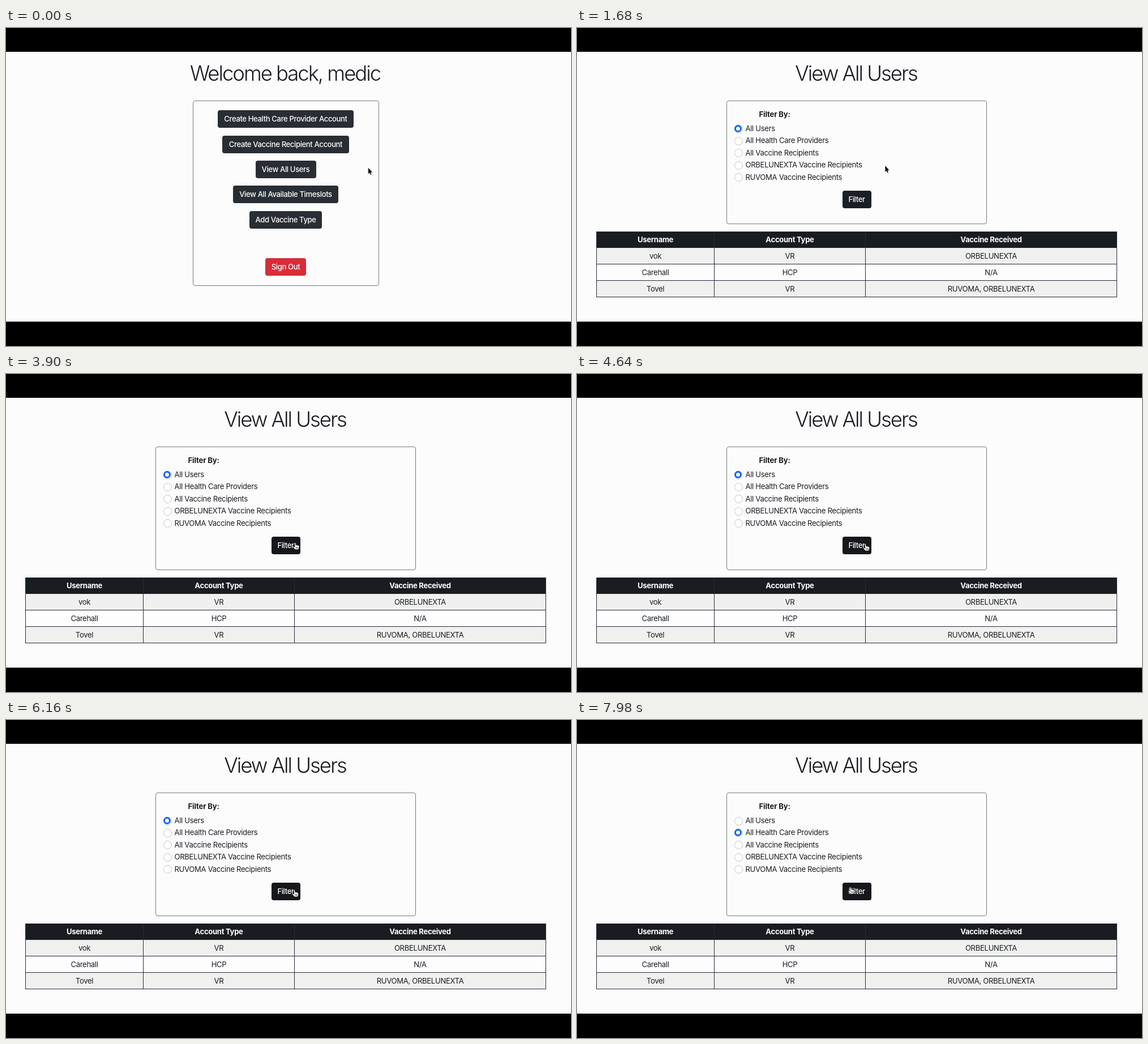
An HTML page that plays this animation: 998x561 px, repeating every 8000 ms.

```html
<!DOCTYPE html>
<html lang="en">
<head>
<meta charset="utf-8">
<title>User overview</title>
<style>
  * { box-sizing: border-box; }
  html, body { margin: 0; width: 100%; height: 100%; overflow: hidden; background: #000; }
  body {
    position: relative;
    font: 430 13.1px/20px Inter, "Open Sans", sans-serif;
    font-optical-sizing: none;
    letter-spacing: -.31px;
    color: #191c20;
  }
  .paper { position: absolute; left: 0; top: 42px; width: 998px; height: 476px; background: #fcfcfd; }
  .page, .page > * { position: absolute; }
  .page { left: 0; top: 0; width: 998px; height: 561px; }
  h1 {
    left: 0; top: 58px; width: 986px; margin: 0;
    text-align: center; white-space: nowrap;
    font-size: 36.5px; line-height: 44px; font-weight: 350; letter-spacing: -2.05px;
  }
  .card { top: 128px; border: 1px solid #777a7d; border-radius: 4px; }
  .button {
    left: calc(494px - var(--w) / 2); top: var(--y); width: var(--w); height: 31px;
    border-radius: 4px; background: #282e33; color: #fff;
    text-align: center; line-height: 31px; font-weight: 540; letter-spacing: -.39px; white-space: nowrap;
  }
  .button.danger { background: #d82c39; }
  .caption { left: 321.5px; top: 142px; font-weight: 700; letter-spacing: -.16px; }
  .option { left: 297.5px; top: calc(var(--y) - 10px); white-space: nowrap; }
  .option::before, .option i {
    content: ""; position: absolute; left: -19.5px; top: 3.5px; width: 13px; height: 13px;
    border: 1px solid #c2c4c7; border-radius: 50%; background: #fff;
  }
  .option i { border: 3.6px solid #0d66f0; }
  .table {
    left: 34px; top: 359px; display: grid; gap: 1px; padding: 1px; background: #272c3d;
    grid-template: 27px repeat(3, 28px) / 207px 266px 443px;
    text-align: center; line-height: 28px;
  }
  .table > * { background: #fdfdfd; }
  .table b { background: #191c20; color: #fff; line-height: 27px; }
  .table .odd { background: #f0f0ef; }

  .home, .users, .first, .second, .arrow, .hand, .open, .filter { animation: 8s step-end infinite; }
  .home { animation-name: home; }
  .users { animation-name: users; }
  .first { animation-name: first; }
  .second { animation-name: second; }
  .arrow { animation-name: arrow; }
  .hand { animation-name: hand; }
  .open { animation-name: open; }
  .filter { animation-name: filter; }
  @keyframes home { 0% { visibility: visible } 20.75%, 100% { visibility: hidden } }
  @keyframes users { 0% { visibility: hidden } 20.75%, 100% { visibility: visible } }
  @keyframes first { 0% { opacity: 1 } 90.5%, 100% { opacity: 0 } }
  @keyframes second { 0% { opacity: 0 } 90.5%, 100% { opacity: 1 } }
  @keyframes arrow {
    0%, 20.75%, 82%  { opacity: 1 }
    11.5%, 48.5%, 98%, 100% { opacity: 0 }
  }
  @keyframes hand {
    0%, 20.75%, 82% { opacity: 0 }
    11.5%, 48.5%, 98%, 100% { opacity: 1 }
  }
  @keyframes open { 0% { background: #282e33 } 11.5%, 100% { background: #1c1f23 } }
  @keyframes filter {
    0%, 82% { background: #1a1f25 }
    48.5%, 98%, 100% { background: #15171b }
  }

  .pointer { position: absolute; left: 0; top: 0; animation: travel 8s ease-in-out infinite; }
  .pointer svg { position: absolute; left: -8px; top: -4px; width: 24px; height: 24px; overflow: visible; }
  @keyframes travel {
    0%, 4%       { transform: translate(639.5px, 246px) }
    13%, 41%     { transform: translate(544px, 242.5px) }
    50%, 80%     { transform: translate(509px, 299px) }
    86%          { transform: translate(428px, 201px) }
    88%, 92.5%   { transform: translate(424px, 200px) }
    99%, 100%    { transform: translate(482.5px, 294px) }
  }
</style>
</head>
<body>
<div class="paper"></div>

<main class="page home">
  <h1>Welcome back, medic</h1>
  <div class="card" style="left:330px;width:329px;height:327px"></div>
  <div class="button" style="--w:240px;--y:145px">Create Health Care Provider Account</div>
  <div class="button" style="--w:224px;--y:189.5px">Create Vaccine Recipient Account</div>
  <div class="button open" style="--w:107px;--y:234px">View All Users</div>
  <div class="button" style="--w:186px;--y:278px">View All Available Timeslots</div>
  <div class="button" style="--w:128px;--y:322.5px">Add Vaccine Type</div>
  <div class="button danger" style="--w:72px;--y:406px">Sign Out</div>
</main>

<main class="page users">
  <h1>View All Users</h1>
  <div class="card" style="left:264px;width:460px;height:218px"></div>
  <div class="caption">Filter By:</div>
  <div class="option" style="--y:177px"><i class="first"></i>All Users</div>
  <div class="option" style="--y:198.4px"><i class="second"></i>All Health Care Providers</div>
  <div class="option" style="--y:219.8px">All Vaccine Recipients</div>
  <div class="option" style="--y:241.2px">ORBELUNEXTA Vaccine Recipients</div>
  <div class="option" style="--y:262.6px">RUVOMA Vaccine Recipients</div>
  <div class="button filter" style="--w:51px;--y:287px">Filter</div>
  <div class="table">
    <b>Username</b><b>Account Type</b><b>Vaccine Received</b>
    <span class="odd">vok</span><span class="odd">VR</span><span class="odd">ORBELUNEXTA</span>
    <span>Carehall</span><span>HCP</span><span>N/A</span>
    <span class="odd">Tovel</span><span class="odd">VR</span><span class="odd">RUVOMA, ORBELUNEXTA</span>
  </div>
</main>

<div class="pointer">
  <svg class="arrow" viewBox="-8 -4 24 24">
    <path d="M.4 .4V11.4L2.8 9.2L4.4 13L6 12.3L4.4 8.6H7.6Z" stroke="#fff" stroke-width="1.8" paint-order="stroke"/>
  </svg>
  <svg class="hand" viewBox="-8 -4 24 24">
    <path d="M-1.2 1Q0 -.6 1.2 1L2 5Q3.2 4 4.2 5.2Q5.4 4.5 6.1 5.8Q7.4 5.4 7.6 6.8V9.5L6.3 13H.5L-3.6 8.2Q-3.6 6.4 -1.6 7.4L-.2 8.2Z"
      fill="#fff" stroke="#111" stroke-width=".9" stroke-linejoin="round"/>
    <path d="M2 8.3V11M3.6 8.3V11M5.2 8.3V11" stroke="#111" stroke-width=".7"/>
  </svg>
</div>
</body>
</html>
```
